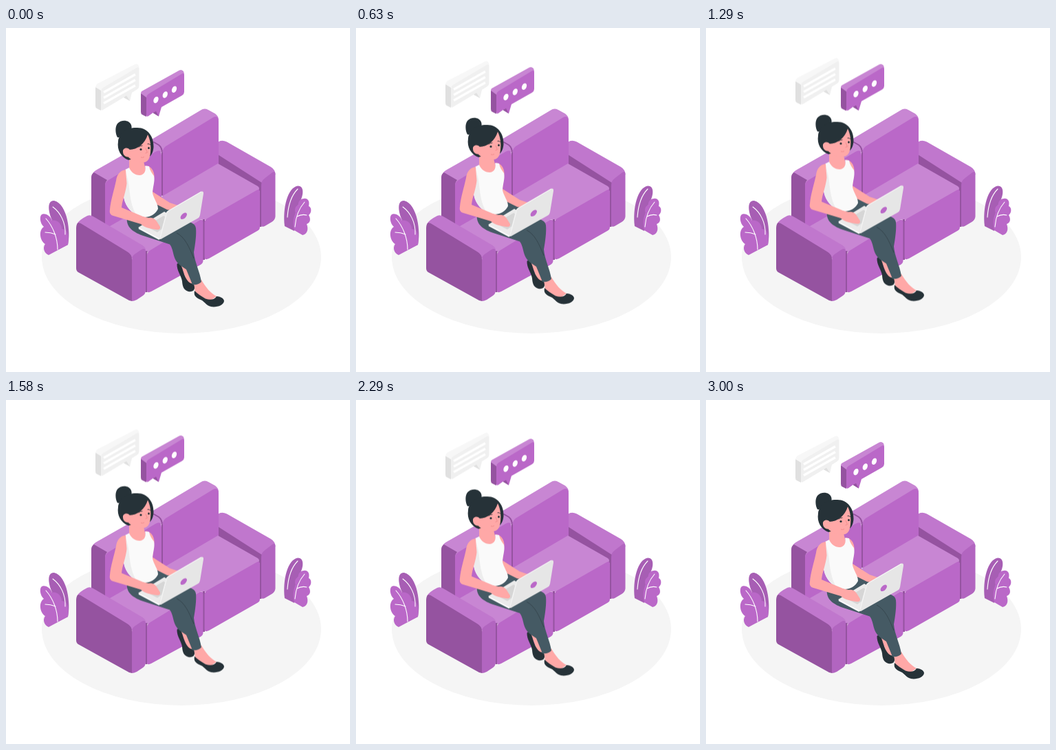
These frames come from a looping animation (500 by 500 pixels, 3040 ms). An HTML page:

```html
<!DOCTYPE html>
<html lang="en">
<head>
<meta charset="utf-8">
<title>Chatting on the sofa</title>
<style>
  html, body { margin: 0; width: 100%; height: 100%; overflow: hidden; background: #fff; }
  svg { display: block; width: 100vw; height: 100vh; }
  .main { fill: #ba68c8; }
  .dark { fill: #9553a0; }
  .light { fill: #c886d3; }
  .mid { fill: #c077cd; }
  .arm { fill: #b265c0; }
  .leaf { fill: #a75eb4; }
  .skin { fill: #ffa8a7; }
  .ink { fill: #263238; }
  .cloth { fill: #455a64; }
  .gap, .vein, .text, .fine { fill: none; stroke-linecap: round; }
  .gap { stroke: #9553a0; stroke-width: 2; }
  .wide { stroke-width: 3; stroke-linecap: butt; }
  .vein { stroke: #fff; stroke-width: 1.1; }
  .text { stroke: #fff; stroke-width: 3.4; stroke-linecap: butt; }
  .fine { stroke: #263238; stroke-width: .9; }
  .float { animation: float 3040ms linear infinite; }
  /* a 3 s bob followed by a short rest */
  @keyframes float {
    0%, 98.684%, 100% { transform: translateY(0); }
    49.342% { transform: translateY(-10px); }
  }
</style>
</head>
<body>
<svg viewBox="0 0 500 500">
  <ellipse cx="255" cy="333" rx="203" ry="111" fill="#f5f5f5"/>

  <g id="plant-left">
    <path class="leaf" d="M90 315C94 298 90 256 70 251C60 250 61 265 66 277C72 292 76 310 76 322Z"/>
    <path class="main" d="M62 330C55 327 53 319 57 314C49 309 47 294 55 289C49 284 48 272 53 270.500C59 269 65 274 67 280C73 278 81 284 81 292C89 292 92 301 90 315Z"/>
    <path class="vein" d="M68 260C79 268 87 283 86 300M58 277C68 288 75 305 75 322M57 297Q65 297 72 300"/>
  </g>
  <g id="plant-right">
    <path class="leaf" d="M405 288C402 262 409 232 424 229.500C433 229 433 241 428 251C421 262 419 275 419 295Z"/>
    <path class="main" d="M431 301C438 300 440 292 437 285C443 283 443 277 440 272C445 268 444 260 440 259C442 251 438 247 433 248C428 248 424 253 425 257C420 259 419 265 421 269C417 276 417 286 419 294Z"/>
    <path class="vein" d="M424 234C414 244 410 260 409 275M434 253C426 262 421 276 420 289M423 274Q430 270 437 272"/>
  </g>

  <g id="sofa">
    <path class="dark" d="M306 178L373 219V240L306 199Z"/>
    <path class="mid" d="M308 166Q313 162 321 165.500L385 202Q391.500 206 391.500 213L372 225L308 184Z"/>

    <path class="light" d="M210 163L283 119.500Q288 116 294 119L304 124.500Q309 128 309 134L228 180Z"/>
    <path class="main" d="M228 180Q228 175 232 172L301 130Q309 126 309 136V198L228 245Z"/>

    <path class="light" d="M126 211Q128 208 132 206L206 164Q211 161 217 165L223 169Q226 172 226 180L146 230Z"/>
    <path class="dark" d="M124 217Q124 212 128 210L147 221Q144 224 144 229V286L124 275Z"/>
    <path class="main" d="M144 229Q144 224 149 221L217 180Q226 175 226 185V247L144 294Z"/>
    <path class="gap" d="M215 166L222 170Q227 174 227 182V243"/>

    <path class="light" d="M228 244L308 197L366 230Q370 233 366 237L293 278Q288 280 283 278L228 247Z"/>
    <path class="light" d="M144 292L228 244L285 277L207 326L150 296Z"/>
    <path class="gap wide" d="M287.500 278V337M204 324V384M370 234V289"/>
    <path class="main" d="M288.500 283Q288.500 279 293 276.500L364 236Q369 233 369 239V289Q369 293 366 294.500L295 335Q288.500 338 288.500 333Z"/>
    <path class="main" d="M205 331Q205 326 209 323.500L280 280Q286.500 276 286.500 283V338Q286.500 342 282 344.500L211 383Q205 386 205 381Z"/>

    <path class="arm" d="M371 229Q371 222 376 218.500L387 210Q391.500 207 391.500 213V274Q391 279 387 281.500L376 288Q371 290 371 286Z"/>

    <path class="mid" d="M103 285Q106 279 118 273Q122 271 127 274L197 315Q203 318 203 323L183 335Z"/>
    <path class="dark" d="M102 291Q102 285 105 283Q108 283 112 286L176 325Q183 329 183 336V397L179 396L105 355Q102 353 102 349Z"/>
    <path class="arm" d="M183 337Q183 331 188 328L197 322Q203 319 203 325V381Q203 386 199 389L190 395Q186 397 183 397Z"/>
  </g>

  <g class="float">
    <g id="bubble-white">
      <path fill="#e0e0e0" d="M130 86L138 90V120L132 117Q130 116 130 113Z"/>
      <path fill="#f7f7f7" d="M130 86Q130 83 133 81L187 53Q190 51.500 192 53.500Q193.500 55 193.500 59L138 91Z"/>
      <path fill="#f0f0f0" d="M138 92Q138 89 141 87L190 58Q193.500 56 193.500 60V84Q193.500 87 191 89L183 94L180 106L171 101L141 119Q138 121 138 117Z"/>
      <path fill="#e0e0e0" d="M171 101L175 98.500L180 106Z"/>
      <path class="text" d="M142 93.500L188 67.500M142 101.500L188 75.500M142 109.500L188 83.500"/>
    </g>

    <g id="bubble-purple">
      <path class="dark" d="M196 95L204 98V129L198 126Q196 125 196 122Z"/>
      <path class="light" d="M196 95Q196 92 199 91L252 61.500Q255 60 257.500 62.500Q259 64 259 69L204 101Z"/>
      <path class="main" d="M204 101Q204 98 207 96L255 67Q259 64.500 259 69V93Q259 96 256 98L226 115L222 128.500L214 123L207 128Q204 130 204 126Z"/>
      <path class="dark" d="M213.500 123.500L218 121L222 128.500Z"/>
      <g fill="#fff">
        <ellipse cx="218" cy="104.500" rx="3.300" ry="5" transform="rotate(25 218 104.500)"/>
        <ellipse cx="231.300" cy="97" rx="3.300" ry="5" transform="rotate(25 231.300 97)"/>
        <ellipse cx="244.500" cy="89.300" rx="3.300" ry="5" transform="rotate(25 244.500 89.300)"/>
      </g>
    </g>

    <g id="legs">
      <path class="skin" d="M254 345L264 350L271 371L265 373Z"/>
      <path class="ink" d="M248.500 343C252 340 255 345 257 352C260 362 264 371 271 371.500L274 374C275 381 272 384 265 383C258 381 256.500 375 256 368C255 360 248 353 248.500 343Z"/>
      <path class="skin" d="M273 370L284 366C290 377 298 386 306 390L296 397L275 385Z"/>
      <path class="ink" d="M274 382C278 386 284 390 290 393.500C297 396 303 395 306 390C311 390 317 393 317 397C316 403 308 406 299 405.300C291 404 289 398 284 395.500C278 393 272 390 274 382Z"/>
      <path class="cloth" d="M176 275C174 288 183 296 198 301.500L238 314.500Q241 318 243 327C245 336 248 342 256 347L262 351L271 373Q278 374.500 284 369C282 355 274 340 273 326C275 315 277 300 276 291C275 284 268 282 260 280L222 254Z"/>
      <path d="M248 298C260 304 266 318 273 335" fill="none" stroke="#37474f"/>
    </g>

    <g id="body">
      <path class="skin" d="M203 200C211 201 215 207 215.500 215L213 238L238 254L250 258L244 266L234 264L208 251L202 215Z"/>
      <path class="skin" d="M179 184L179 205L188 217L201 214L203 206L199 190Z"/>
      <path fill="#fafafa" d="M173 206L179 203C182 210 188 214.500 195 214C201 213 204 208 202 200.500L208 201C209 207 212 211 215 215C217 223 213 232 213 240C215 249 221 255 221 263C216 273 205 277 195 274C184 270 174 262 171 246C170 238 176 227 173 206Z"/>
      <path fill="#ededed" d="M171 243C170 238 177 226 175 212C181 232 178 252 189 271C179 266 172 255 171 243Z"/>
    </g>

    <g id="laptop">
      <path fill="#ebebeb" d="M192 290L230 267L246 276L225 307H222Z"/>
      <path fill="#d6d6d6" d="M203 288L229 273L232 275L228 291L220 297Z"/>
      <path d="M193 291L223 307" fill="none" stroke="#fafafa" stroke-width="2"/>
      <path fill="#e6e6e6" d="M232 271Q232.500 268 235 266L283 238Q287.500 236 287 241L282 272Q281.500 275 279 276.500L226 306.500Q222.500 308 223 304Z"/>
      <path d="M224 305L233 271Q233 268 236 266L284 238" fill="none" stroke="#f5f5f5" stroke-width="1.200"/>
      <ellipse class="main" cx="258.300" cy="273.300" rx="5.800" ry="3.300" transform="rotate(-45 258.300 273.300)"/>
    </g>

    <path id="arm" class="skin" d="M174 206C165 207 161 214 160 222C157 236 152 251 151 264C150 269 152 272 156 273L196 285C201 290 210 292 218 293Q225 294 224 289L219 281Q215 275 207 276L199 274L168 261C169 250 174 240 175.500 226Z"/>

    <g id="head">
      <path class="ink" d="M162 159C159 154 158 144 162 139C167 133 179 133 182 141C184 147 181 154 172 155C167 155 166 160 162 159Z"/>
      <path class="ink" d="M178 192C167 188 161 177 163 165C164 152 178 144 191 145C206 145 215 158 214.500 173C214 181 211 186 207 188L185 190Z"/>
      <path class="skin" d="M206 155C210 163 211 172 210 181C209 190 206 195 200 195.500C194 196 188 195 183 192L178 188L179 177C191 177 202 168 206 155Z"/>
      <path class="skin" d="M180 177C176 172 169 175 170 180C170 186 176 189 181 187Z"/>
      <circle class="ink" cx="196" cy="176.500" r="1.600"/>
      <circle class="ink" cx="207.500" cy="174.500" r="1.500"/>
      <path class="fine" d="M193 173Q195 171 198 171M206 168.500Q208 168 209.500 169.500"/>
      <path d="M203 175L205.500 181L202.500 182M196 188Q199 189 201 187.500" fill="none" stroke="#f28f8f"/>
    </g>
  </g>
</svg>
</body>
</html>
```
